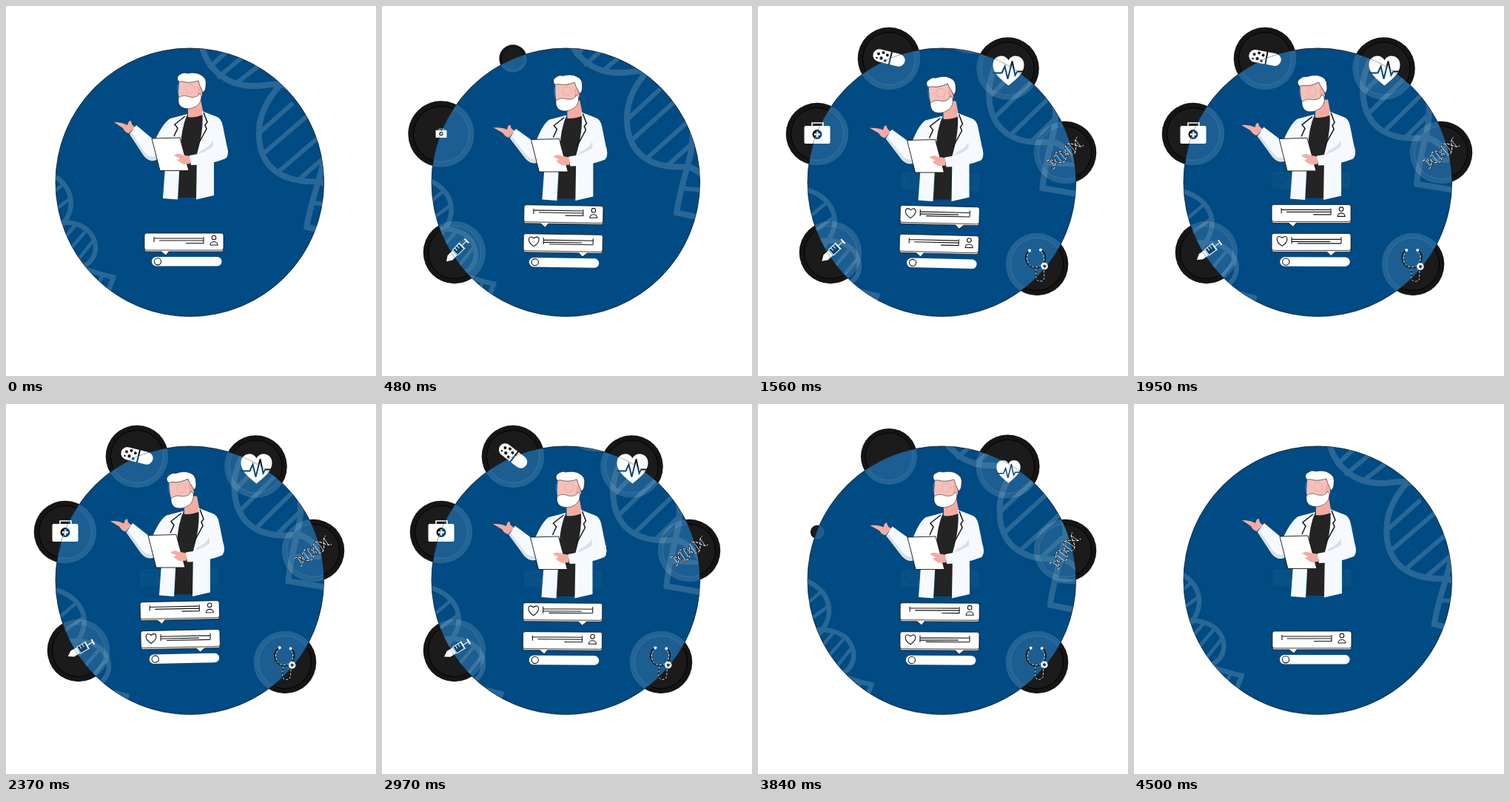
These frames come from a looping animation (500x500 px, 4.53 s). An HTML page:

```html
<!DOCTYPE html>
<html lang="en">
<head>
<meta charset="utf-8">
<title>Online doctor</title>
<style>
html, body { margin: 0; width: 100%; height: 100%; overflow: hidden; background: #fff; }
svg { display: block; width: 100vw; height: 100vh; }
.strand { fill: none; stroke: #fff; stroke-width: 8; }
.strand .rung { stroke-width: 6; }
.small { stroke-width: 6.5; }
.small .rung { stroke-width: 4.5; }
.coat { fill: #f6fafe; }
.shade { fill: #d9e0e6; }
.skin { fill: #f4aca2; }
.face { fill: #f6c0b8; }
.dark { fill: #242424; }
.ink { fill: none; stroke: #151515; stroke-width: 1.1; }
.card { fill: #fff; stroke: #111; stroke-width: .8; }
.out { --hole: #161616; }
.in { --hole: #0b4675; }
.out .disc { fill: #151515; }
.out .inner { fill: #1b1b1b; stroke: #000; stroke-width: .9; }
.in .disc { fill: #fff; fill-opacity: .14; }
.in .inner { fill: #004b83; fill-opacity: .22; stroke: #ffffff20; stroke-width: .8; }
.hole { fill: var(--hole); }
.cut { fill: none; stroke: var(--hole); stroke-width: 2; }
.white { fill: #fff; }
.line { fill: none; stroke: #fff; stroke-width: 1; }
.black { fill: none; stroke: #101820; stroke-width: 2; }
</style>
</head>
<body>
<svg viewBox="0 0 500 500" xmlns="http://www.w3.org/2000/svg">
<defs>
  <clipPath id="globe"><circle cx="248.3" cy="238.3" r="181.3"/></clipPath>

  <g id="pill">
    <rect class="white" x="-22" y="-8.5" width="44" height="17" rx="8.5"/>
    <path class="cut" d="M2-9V9"/>
    <g class="hole">
      <circle cx="-15" cy="-2" r="2"/><circle cx="-9" cy="-5" r="2"/><circle cx="-10" cy="3" r="2.2"/>
      <circle cx="-3" cy="-3" r="2"/><circle cx="-4" cy="5" r="1.8"/><circle cx="-16" cy="4" r="1.3"/>
    </g>
  </g>
  <g id="heart">
    <path class="white" d="M0 3C-12-7-21-14-21-25C-21-38-5-41 0-31C5-41 21-38 21-25C21-14 12-7 0 3Z"/>
    <path class="cut" d="M-21-14H-9L-5-23L-1-6L5-30L9-11L12-16H21"/>
  </g>
  <g id="kit">
    <rect class="white" x="-17.5" y="-10" width="35" height="24" rx="2"/>
    <path class="line" style="stroke-width:1.6" d="M-7-10V-14H8V-10"/>
    <circle class="hole" cy="1.5" r="6.5"/>
    <path class="white" d="M-1.3-2.5H1.3V.2H4V2.8H1.3V5.5H-1.3V2.8H-4V.2H-1.3Z"/>
  </g>
  <g id="syringe">
    <path class="white" d="M-20 0L-13-4.5H-4V4.5H-13Z"/>
    <path class="hole" stroke="#fff" d="M-3-5H9V5H-3Z"/>
    <path class="line" d="M1-5V0M5-5V0M9 0H19M10-6V6"/>
    <path class="line" style="stroke-width:2" d="M19-4V4"/>
  </g>
  <g id="helix">
    <path class="black" d="M-26-7C-17-7-17 8-8 8S1-8 9-8S18 7 26 7M-26 7C-17 7-17-8-8-8S1 8 9 8S18-7 26-7"/>
    <path class="line" stroke-dasharray="4 1.5" d="M-26-7C-17-7-17 8-8 8S1-8 9-8S18 7 26 7M-26 7C-17 7-17-8-8-8S1 8 9 8S18-7 26-7"/>
    <path class="line" style="stroke-width:.7" d="M-22-5V5M-11-7V7M-5-6V6M6-6V6M12-7V7M22-5V5"/>
  </g>
  <g id="scope">
    <path class="black" d="M-8-19C-20-14-15 4-2 5C12 4 17-14 5-19M-2 5V18C-2 27 10 27 10 18V4"/>
    <path class="line" style="stroke-width:.8" stroke-dasharray="3 2" d="M-8-18C-17-13-14 4-2 4C11 4 14-13 5-18M-2 6V18C-2 25 9 25 9 18V6"/>
    <circle class="white" cx="-9" cy="-19" r="2"/><circle class="white" cx="6" cy="-19" r="2"/>
    <circle class="white" cx="10" cy="3" r="4.8"/><circle class="hole" cx="10" cy="3" r="2"/>
  </g>

  <g id="userCard">
    <path class="card" d="M190 309H291Q294 309 294 312V329Q294 332 291 332H220L216 337L210 332H190Q187 332 187 329Z"/>
    <rect class="card" x="187" y="307" width="107" height="23" rx="3"/>
    <path class="ink" d="M200 312V319M200 314H266M207 317H267M243 320.5H267M267 312V321"/>
    <circle class="ink" cx="281" cy="313" r="2.8"/>
    <path class="ink" d="M276 323C276 317 286 317 286 323Z"/>
  </g>
  <g id="heartCard">
    <path class="card" d="M190 309H291Q294 309 294 312V329Q294 332 291 332H273L267 337L262 332H190Q187 332 187 329Z"/>
    <rect class="card" x="187" y="307" width="107" height="23" rx="3"/>
    <path class="ink" d="M201 324C190 317 194 307 201 313C208 307 212 317 201 324Z"/>
    <path class="ink" d="M214 312V321M214 315H281M214 318H266M222 320.5H281M281 312V320"/>
  </g>
</defs>

<g class="out" id="under"></g>
<circle cx="248.3" cy="238.3" r="181.3" fill="#004b83" stroke="#061522" stroke-width=".8"/>

<g clip-path="url(#globe)">
  <g opacity=".16"><g class="strand" id="right">
    <path d="M262 30C262 86 302 114 350 107S424 135 430 190C432 222 414 250 406 300"/>
    <path d="M400 50C396 95 352 110 343 158C336 212 366 240 424 237C450 247 462 275 470 312"/>
    <path d="M403 298L470 314"/>
    <path class="rung" d="M274 84L302 58M286 97L334 57M308 107L358 68M344 170L388 131M347 200L410 146M367 225L422 178M394 236L430 205M414 266L452 270"/>
  </g></g>
  <g opacity=".16"><g class="strand small" id="left">
    <path d="M30 220C85 224 100 265 78 293C58 318 62 345 92 352C112 356 130 364 148 367"/>
    <path d="M30 282C55 300 72 288 92 294C120 300 130 330 112 347C96 356 86 372 92 400"/>
    <path d="M146 364L138 386"/>
    <path class="rung" d="M52 262L78 240M60 280L87 260M75 318L93 297M82 334L107 305M95 346L117 318M104 378L117 358M120 386L130 364"/>
  </g></g>
</g>

<g class="in" id="over" clip-path="url(#globe)"></g>

<g id="chat">
  <g id="cards"></g>
  <g id="bar">
    <rect x="197" y="339" width="94.500" height="12.500" rx="6.200" fill="#fff"/>
    <circle class="ink" cx="205" cy="345.300" r="4.600"/>
  </g>
</g>

<g id="doctor">
  <path class="skin" d="M246 126H263L267 147Q258 154 246 150Z"/>
  <path class="dark" d="M241 150Q255 152 268 146L266 190L258 259L233 259L236 180Z"/>
  <path class="coat" d="M245 146L222 152Q212 160 208 176L216 205L212 260L232 261.5L236 190Q237 165 245 146Z"/>
  <path class="coat" d="M265 142L283 149Q291 151 293 162L300 197Q300 205 292 207L281 210V256L257 261.5L258 200Q268 165 265 142Z"/>
  <path class="shade" d="M264 195Q276 190 280 181V192L258 202Z"/>
  <path class="ink" style="stroke-width:1.5" d="M242 149L228 160L232 165L227 176M267 144L272 157L269 161L271 166L259 188"/>
  <g id="arm">
    <path class="skin" d="M176 164L171 167L166 172Q161 171 158 165L146 157Q157 157 164 161L166 156L169 155Q169 162 176 164Z"/>
    <path class="coat" d="M222 152Q212 158 201 182L176 161L167 173L186 202Q194 212 203 208L216 195Z"/>
    <path class="shade" d="M167 173L186 202Q194 212 204 207L203 203Q194 206 187 197L169 170Z"/>
  </g>
  <path d="M197 179L235 178L247 222.5L208 222.5Z" fill="#fff" stroke="#111" stroke-width=".9"/>
  <path class="skin" d="M227 202Q232 198 238 201L249 203V213L240 214Q234 211 231 208L235 206Z"/>
  <path class="coat" d="M283 188Q268 200 248 202L250 215Q275 215 297 206Q301 203 299 190Z"/>
  <g id="head">
    <path class="face" d="M234 101H265V120Q260 133 248 133H236Q233 126 233 118Z"/>
    <path class="skin" d="M259 109H265V121L259 124Z"/>
    <circle cx="249" cy="112" r="6" fill="none" stroke="#d9b4b0"/>
    <path d="M233 106Q231 112 233 118" fill="none" stroke="#3c86bd"/>
    <path class="white" stroke="#111" stroke-width=".6" d="M233 102Q229 95 236 92Q240 89 245 91Q257 89 263 93Q272 97 270 108Q270 114 266 117L264 112Q261 107 260 101Q247 105 239 102Z"/>
    <path class="white" stroke="#111" stroke-width=".5" d="M233 124Q240 119 248 123Q259 125 261 118L264 121Q264 132 256 136Q247 141 238 137Q232 134 233 124Z"/>
  </g>
</g>
</svg>

<script>
const LOOP = 4530;
const $ = id => document.getElementById(id);
const clamp = v => Math.min(1, Math.max(0, v));
const smooth = u => u * u * (3 - 2 * u);
const outCubic = u => 1 - (1 - u) ** 3;
const outBack = (u, k = 1.7) => 1 + (k + 1) * (u - 1) ** 3 + k * (u - 1) ** 2;

// Smooth looping curve through values at the shared pose times
const TIMES = [0, 930, 1560, 2370, 2970, 3840];
const poseTime = i => TIMES[(i + 6) % 6] + Math.floor(i / 6) * LOOP;
function pose(values, t) {
  let i = 5;
  while (TIMES[i] > t) i--;
  const v = j => values[(j + 6) % 6];
  const slope = j => (v(j + 1) - v(j - 1)) / (poseTime(j + 1) - poseTime(j - 1));
  const span = poseTime(i + 1) - poseTime(i), u = (t - poseTime(i)) / span, w = smooth(u);
  return v(i) * (1 - w) + v(i + 1) * w
    + span * u * (1 - u) * ((1 - u) * slope(i) - u * slope(i + 1));
}

const still = [0, 0, 0, 0, 0, 0];
const sway = { x: [0, 8.5, 4.5, -5, 3.5, 5], y: [0, 3, 2.5, -1.5, 1, 1] };
const nod = [0, -8, -8, -9, 0, 0];
const lift = [0, -8.5, -4, -2, -3, -4.5];
const chatTilt = [0, 1.8, 1.4, -1.2, 0.4, 0.3];
const barX = [0, 5, 5, -4, 2, 3];

const badges = [
  { icon: 'syringe', x: 98, y: 333, dx: 3, dy: -2, start: 20, end: 3770, turn: [-45, -45, -43, -30, -32, -40] },
  { icon: 'kit', x: 80, y: 173, dx: 0, dy: -1, start: 234, end: 3858, turn: still },
  { icon: 'pill', x: 177, y: 71, dx: 0, dy: -1, start: 446, end: 3945, turn: [40, 38, 14, 14, 38, 40] },
  { icon: 'heart', x: 337.5, y: 84.5, dx: 1, dy: 20, start: 645, end: 4120, turn: still },
  { icon: 'helix', x: 415, y: 198, dx: 0, dy: 1, start: 873, end: 4215, turn: [-35, -35, -38, -36, -34, -54] },
  { icon: 'scope', x: 377, y: 349, dx: 0, dy: 0, start: 1082, end: 4310, turn: [0, 0, -3, 5, 4, 2] }
];

const NS = 'http://www.w3.org/2000/svg';
function add(parent, tag, attrs) {
  const el = document.createElementNS(NS, tag);
  for (const k in attrs) el.setAttribute(k, attrs[k]);
  return parent.appendChild(el);
}
const move = (el, value) => el.setAttribute('transform', value);

for (const b of badges) {
  b.layers = ['under', 'over'].map(id => {
    const disc = add($(id), 'g', {});
    add(disc, 'circle', { class: 'disc', r: 42.3 });
    add(disc, 'circle', { class: 'inner', r: 35.5 });
    return { disc, icon: add($(id), 'use', { href: '#' + b.icon }) };
  });
}
const cards = Array.from({ length: 7 }, (_, i) =>
  add($('cards'), 'use', { href: i % 2 ? '#heartCard' : '#userCard' }));

function drawBadge(b, t) {
  const entering = t < LOOP / 2;
  const size = entering
    ? outBack(clamp((t - b.start) / 320))
    : outBack(clamp((b.end - t) / 320), 1.4);
  const iconSize = entering
    ? outCubic(clamp((t - b.start - 205) / 250))
    : clamp((b.end - 110 - t) / 220);
  const turn = pose(b.turn, t);
  for (const { disc, icon } of b.layers) {
    move(disc, `translate(${b.x} ${b.y}) scale(${Math.max(0, size)})`);
    move(icon, `translate(${b.x + b.dx} ${b.y + b.dy}) rotate(${turn}) scale(${iconSize})`);
  }
}

function drawCards(t, x, y) {
  // The list climbs one slot every 800 ms
  let count = 0;
  for (let k = 0; k < 6; k++) count += smooth(clamp((t - k * 800) / 260));
  cards.forEach((card, i) => {
    const slot = count - i;
    const size = clamp(1 + slot / 0.45);
    const up = 39 * clamp(slot) + 45 * clamp(slot - 1);
    let alpha = slot > 2.001 ? 0.03 * clamp(1 - (slot - 2) * 3) : 1 - 0.97 * clamp(slot - 1) ** 2;
    if (i === 5) alpha *= 1 - clamp((t - 4200) / 240);
    card.setAttribute('opacity', alpha);
    move(card, `translate(${x + 240.5} ${y + 320 - up}) scale(${size}) translate(-240.5 -320)`);
  });
}

function draw(t) {
  const drift = Math.sin(Math.PI * t / LOOP);
  move($('right'), `translate(${-33 * drift} ${-57 * drift}) rotate(${-4 * drift} 372 180)`);
  move($('left'), `translate(${18 * drift} ${28 * drift})`);
  const x = pose(sway.x, t), y = pose(sway.y, t), tilt = pose(nod, t);
  move($('doctor'), `translate(${x} ${y})`);
  move($('head'), `translate(${tilt / 4} ${-tilt / 5}) rotate(${tilt} 256 145)`);
  move($('arm'), `rotate(${pose(lift, t)} 222 156)`);
  move($('chat'), `rotate(${pose(chatTilt, t)} 244 310)`);
  move($('bar'), `translate(${pose(barX, t)} ${y})`);
  drawCards(t, x, y);
  badges.forEach(b => drawBadge(b, t));
}

function tick() {
  draw(performance.now() % LOOP);
  requestAnimationFrame(tick);
}
tick();
</script>
</body>
</html>
```
